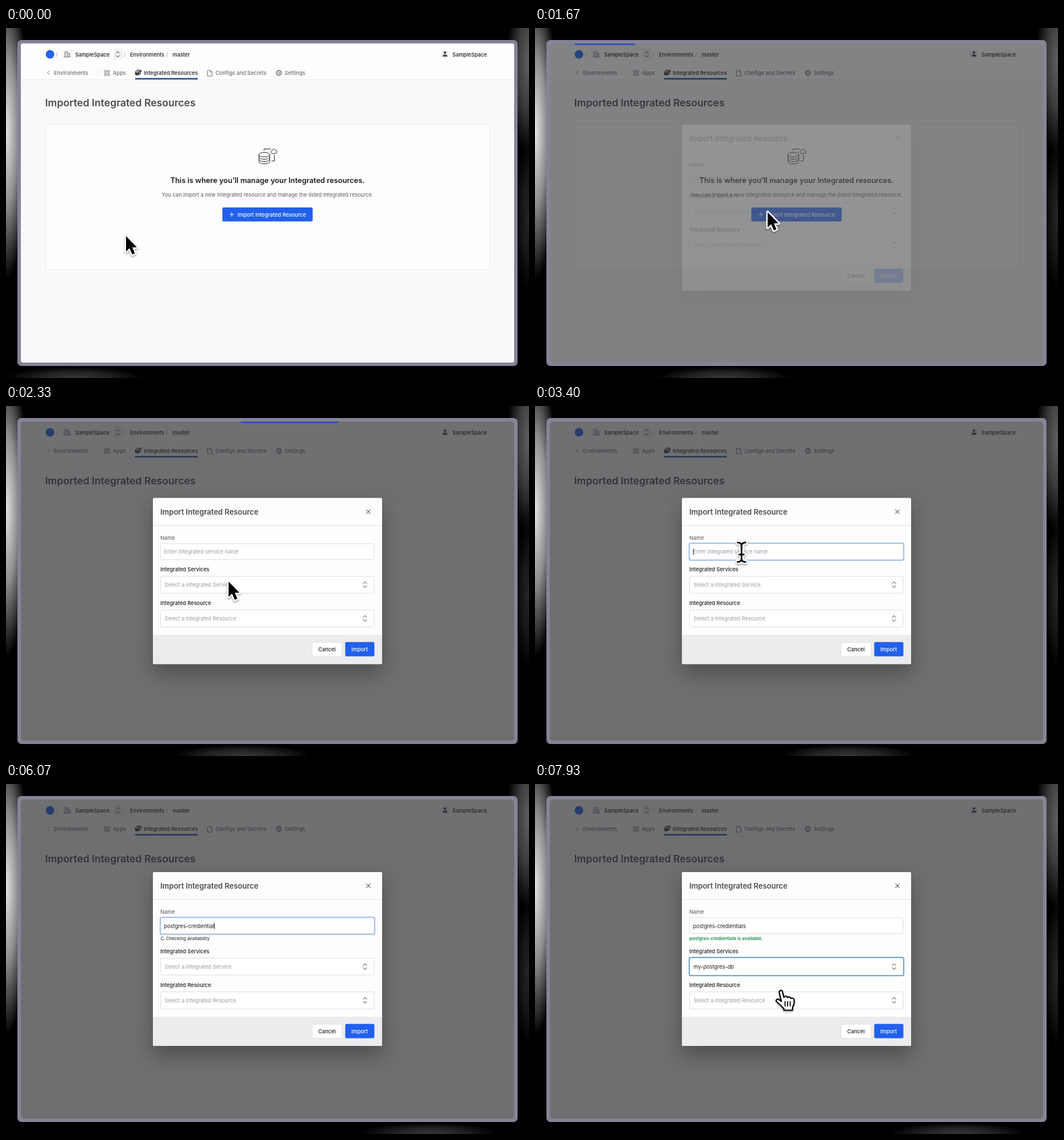
Write an HTML page that moves like this. It is 915 px wide and 612 px high and loops after 8000 ms.

```html
<!DOCTYPE html>
<html lang="en">
<head>
<meta charset="utf-8">
<title>Import Integrated Resource</title>
<style>
  html, body { margin: 0; width: 100%; height: 100%; overflow: hidden; background: #000; }
  svg { display: block; width: 100vw; height: 100vh; }
  text { font: 500 9.2px Inter, sans-serif; dominant-baseline: central; fill: #1d1d20; }
  .nav { fill: #6d6d75; }
  .active { fill: #37373c; font-weight: 600; }
  .regular { font-weight: 400; }
  .hint { font-weight: 400; fill: #9b9ba3; }
  .white { fill: #fff; }
  .mid { text-anchor: middle; }
  .icon { fill: none; stroke: #6d6d75; stroke-width: 1; stroke-linecap: round; stroke-linejoin: round; }
  .dark { stroke: #26262a; }
  .field { fill: #fff; stroke: #dcdce0; stroke-width: 1; }
  .ring { fill: none; stroke: #8fb5e6; stroke-width: 1.5; }
  #serviceRing { stroke: #4a90c4; }
  #modal { filter: drop-shadow(0 16px 18px rgba(0, 0, 0, .3)); }
  #pointer { filter: drop-shadow(0 2px 1.5px rgba(0, 0, 0, .35)); }
</style>
</head>
<body>
<svg viewBox="0 0 915 612" preserveAspectRatio="none">
  <defs>
    <radialGradient id="glow">
      <stop offset="0" stop-color="#fff"/>
      <stop offset=".5" stop-color="#fff" stop-opacity=".62"/>
      <stop offset="1" stop-color="#fff" stop-opacity="0"/>
    </radialGradient>
    <path id="sort" class="icon dark" d="M-3-2 0-5 3-2M-3 2 0 5 3 2"/>
    <path id="beamShape" d="M-7-17Q0-17 0-11V11Q0 17-7 17M7-17Q0-17 0-11M0 11Q0 17 7 17M-4 4H4"/>
    <clipPath id="screen"><rect x="26" y="27" width="863" height="558" rx="4"/></clipPath>
  </defs>

  <rect width="915" height="612"/>
  <g fill="url(#glow)">
    <ellipse cx="0" cy="180" rx="40" ry="260" opacity=".9"/>
    <ellipse cx="915" cy="60" rx="38" ry="160" opacity=".38"/>
    <ellipse cx="915" cy="330" rx="24" ry="130" opacity=".15"/>
    <ellipse id="bottomGlow" cy="612" rx="120" ry="20" opacity=".22"/>
  </g>
  <rect x="20" y="21" width="875" height="570" rx="7" fill="#858497"/>

  <g clip-path="url(#screen)">
    <rect x="26" y="27" width="863" height="558" fill="#f9f9f9"/>
    <rect x="26" y="27" width="863" height="63.5" fill="#fdfdfd"/>
    <path d="M26 90.5H889" stroke="#ebebed"/>
    <rect x="69.500" y="168.500" width="777" height="254" fill="#fdfdfd" stroke="#ececee"/>

    <circle cx="77" cy="46" r="7.500" fill="#2563eb"/>
    <g class="nav">
      <text x="87" y="46" class="hint">/</text>
      <text x="206" y="46" class="hint">/</text>
      <text x="280" y="46" class="hint">/</text>
    </g>
    <rect x="99" y="38" width="16" height="16" rx="2" fill="#f5f5f6"/>
    <path class="icon" d="M103 50.500V41.500H107.500V50.500M107.500 44.500H111.500V50.500M102 50.500H112.500M105 44V44.500M105 47V47.500M109.500 47V47.500"/>
    <text x="121" y="46">SampleSpace</text>
    <rect x="188" y="36" width="16" height="20" rx="2" fill="#f2f2f3"/>
    <use href="#sort" x="195.500" y="46"/>
    <text x="217" y="46">Environments</text>
    <text x="291.500" y="46">master</text>
    <circle cx="768" cy="46" r="7.500" fill="#efeff1"/>
    <circle cx="768" cy="43" r="2.200" fill="#45454b"/>
    <path d="M764 50V49Q764 46.500 766 46.500H770Q772 46.500 772 49V50Z" fill="#45454b"/>
    <text x="781" y="46">SampleSpace</text>

    <path class="icon" d="M75.500 75 72.500 78 75.500 81"/>
    <text x="84" y="78" class="nav">Environments</text>
    <path d="M160.500 72V85" stroke="#e4e4e7"/>
    <g class="icon">
      <circle cx="174" cy="76" r="2"/><circle cx="179.500" cy="76" r="2"/>
      <circle cx="174" cy="81.500" r="2"/><circle cx="179.500" cy="81.500" r="2"/>
      <path d="M353 74H357.500L360.500 77V84H353ZM357.500 74V77H360.500"/>
      <circle cx="477.500" cy="78.500" r="4.200" stroke-dasharray="2.200 1.100" stroke-width="1.600"/>
      <circle cx="477.500" cy="78.500" r="1.700"/>
    </g>
    <text x="187" y="78.500" class="nav">Apps</text>
    <g transform="translate(226 73) scale(.33)">
      <use href="#database" stroke-width="3.400"/>
    </g>
    <text x="241" y="78.500" class="active">Integrated Resources</text>
    <rect x="226" y="87.500" width="109.500" height="2.500" fill="#264a96"/>
    <text x="366.500" y="78.500" class="nav">Configs and Secrets</text>
    <text x="487.500" y="78.500" class="nav">Settings</text>

    <text x="68.500" y="130.500" style="font-size:17.600px;font-weight:600;fill:#4b4b51">Imported Integrated Resources</text>

    <g transform="translate(441 210)">
      <g id="database" fill="none" stroke="#26262a" stroke-linecap="round" stroke-linejoin="round">
        <ellipse cx="11" cy="11.500" rx="9.500" ry="4"/>
        <path d="M1.500 11.500V23.500C1.500 29 20.500 29 20.500 23.500V11.500M1.500 15.500C1.500 21 20.500 21 20.500 15.500M1.500 19.500C1.500 25 20.500 25 20.500 19.500M10.500 4V1.500H22M24 22.500H28.500V12"/>
        <path d="M24.500 9.500A2.500 2.500 0 0 1 24 4.800 3.500 3.500 0 0 1 30.300 3.500 3 3 0 0 1 29.500 9.500Z"/>
      </g>
    </g>
    <text x="457.500" y="266.500" class="mid" style="font-size:12.850px;font-weight:600">This is where you’ll manage your Integrated resources.</text>
    <text x="457.500" y="291.500" class="mid regular" style="fill:#5c5c63">You can import a new integrated resource and manage the listed integrated resource.</text>
    <rect x="378.500" y="313.700" width="158" height="24.600" rx="2" fill="#2160ec"/>
    <path class="icon" style="stroke:#fff" d="M391.500 326H398.500M395 322.500V329.500"/>
    <text x="465" y="326" class="mid white">Import Integrated Resource</text>

    <rect id="overlay" x="26" y="27" width="863" height="558" fill="#28282b"/>
    <rect id="loader" y="27" height="3" fill="#3553b4"/>
  </g>

  <g id="modal">
    <rect id="sheet" x="257" width="401" rx="2" fill="#fdfdfd"/>
    <text x="270" y="24" style="font-size:13px;font-weight:600;fill:#4b4b52">Import Integrated Resource</text>
    <path class="icon dark" d="M630.500 20.500 637.500 27.500M637.500 20.500 630.500 27.500"/>
    <path d="M257 48H658" stroke="#dededf"/>
    <text x="270" y="69.500" class="nav">Name</text>
    <rect class="field" x="270.500" y="80" width="373.500" height="27.500" rx="2"/>
    <rect id="nameRing" class="ring" x="269.700" y="79" width="375.500" height="30" rx="3"/>
    <text id="nameText" x="276.500" y="94"></text>
    <path id="caret" d="M0 88.500V99.500" stroke="#1d1d20"/>
    <g id="checking">
      <circle cx="274" cy="116" r="2.800" class="icon" stroke-dasharray="13 5" id="spinner"/>
      <text x="279.500" y="116" class="regular" style="font-size:7.900px">Checking availability</text>
    </g>
    <text id="available" x="270" y="116" style="font-size:7.800px;font-weight:700;fill:#2f9a5f">postgres-credientials is available.</text>

    <g id="lower">
      <text x="270" y="125">Integrated Services</text>
      <rect class="field" x="270.500" y="137" width="373.500" height="29.500" rx="2"/>
      <rect id="serviceRing" class="ring" x="269.700" y="135.700" width="375.500" height="32" rx="3"/>
      <text id="serviceText" x="277.500" y="151.700"></text>
      <use href="#sort" x="628" y="151.700"/>
      <text x="270" y="184">Integrated Resource</text>
      <rect class="field" x="270.500" y="196" width="373.500" height="29.500" rx="2"/>
      <text x="277.500" y="210.700" class="hint">Select a Integrated Resource</text>
      <use href="#sort" x="628" y="210.700"/>
      <path d="M257 239.500H658V288.500Q658 290.500 656 290.500H259Q257 290.500 257 288.500Z" fill="#ececee"/>
      <rect x="535.500" y="252.500" width="52.500" height="24.500" rx="2" fill="#fff" stroke="#e0e0e3"/>
      <text x="561.500" y="264.700" class="mid">Cancel</text>
      <rect x="593.500" y="252" width="51" height="25" rx="2" fill="#2160ec"/>
      <text x="618.700" y="264.700" class="mid white">Import</text>
    </g>
  </g>

  <g id="pointer" stroke-linejoin="round" stroke-linecap="round">
    <path id="arrow" d="M2 4V31L8 25 13 36 17.500 34 13 23.500H21Z" fill="#000" stroke="#fff" stroke-width="5" paint-order="stroke"/>
    <g id="beam" fill="none">
      <use href="#beamShape" stroke="#fff" stroke-width="7.500"/>
      <use href="#beamShape" stroke="#111" stroke-width="3"/>
    </g>
    <g id="hand" stroke="#000" stroke-width="2.200">
      <path d="M-2.500 3C-3.500-1.500 2-2.500 3 1.500L5.500 11C7 8 11 8.500 11.500 11.500 13 9.500 17 10 17.500 13 20 11.500 23.500 13 23.500 16.500 24 22 22 26 20.500 29V33.500H5.500V31C2 27-3 22-7.500 18.500-9.500 15.500-6 13-3 15L1 18Z" fill="#fff"/>
      <path d="M7.500 18.500V26M12 18.500V26M16.500 18.500V26" fill="none" stroke-width="1.800"/>
    </g>
  </g>
</svg>

<script>
const LOOP = 8000;
const NAME = 'postgres-credientials';
const TYPE_START = 4020, CHAR_TIME = 106;
const $ = id => document.getElementById(id);
const clamp = v => Math.min(1, Math.max(0, v));
const span = (t, from, to) => clamp((t - from) / (to - from));
const smooth = p => p * p * (3 - 2 * p);
const show = (id, on) => $(id).setAttribute('visibility', on ? 'visible' : 'hidden');
const set = (id, attrs) => Object.entries(attrs).forEach(([k, v]) => $(id).setAttribute(k, v));

// time, x, y of each pointer stop
const route = [
  [0, 208, 360], [200, 208, 360], [850, 217, 97], [1130, 218, 98], [1520, 405, 318],
  [2200, 405, 318], [2480, 366, 285], [2800, 358, 256], [6700, 410, 254],
  [6960, 422, 307], [7150, 426, 323], [7380, 426, 323], [7650, 430, 362], [LOOP, 430, 362]
];

function pointerAt(t) {
  const i = Math.max(1, route.findIndex(stop => stop[0] > t));
  const [t0, x0, y0] = route[i - 1], [t1, x1, y1] = route[i];
  const p = smooth(span(t, t0, t1));
  return [x0 + (x1 - x0) * p, y0 + (y1 - y0) * p];
}

function drawLoader(t) {
  const left = Math.max(69, 69 + (t - 1670) * .517);
  const right = Math.min(889, 174 + (t - 1670) * .617);
  set('loader', { x: left, width: Math.max(0, right - left) });
  show('loader', t >= 1560 && right > left);
}

function drawForm(t) {
  const typed = Math.max(0, Math.min(NAME.length, Math.floor((t - TYPE_START) / CHAR_TIME) + 1));
  const grown = typed > 0 ? 13.5 : 0;
  const rise = 9 * (1 - smooth(span(t, 1630, 1820)));
  $('modal').style.opacity = smooth(span(t, 1630, 1810));
  set('modal', { transform: `translate(0 ${160.8 - grown / 2 + rise})` });
  set('sheet', { height: 290.5 + grown });
  set('lower', { transform: `translate(0 ${grown})` });

  const nameFocus = t >= 3050 && t < 7250;
  show('nameRing', nameFocus);
  $('nameText').textContent = typed ? NAME.slice(0, typed) : 'Enter integrated service name';
  set('nameText', { class: typed ? 'regular' : 'hint' });
  const end = typed ? $('nameText').getComputedTextLength() : 0;
  set('caret', { transform: `translate(${277 + end} 0)` });
  const typing = typed > 0 && typed < NAME.length;
  show('caret', nameFocus && (typing || Math.floor(t / 500) % 2 === 0));

  show('checking', typed > 0 && t < 6550);
  show('available', t >= 6550);
  set('spinner', { transform: `rotate(${t * .36} 274 116)` });

  const chosen = t >= 7740;
  show('serviceRing', t >= 7250);
  $('serviceText').textContent = chosen ? 'my-postgres-db' : 'Select a Integrated Service';
  set('serviceText', { class: chosen ? 'regular' : 'hint' });
}

function drawPointer(t) {
  const [x, y] = pointerAt(t);
  set('pointer', { transform: `translate(${x} ${y})` });
  show('arrow', t < 2560);
  show('beam', t >= 2560 && t < TYPE_START || t >= 6700 && t < 6990);
  $('beam').style.opacity = 1 - .5 * span(t, 6850, 6990);
  show('hand', t >= 6990);
}

function draw(now) {
  const t = now % LOOP;
  $('overlay').style.opacity = .66 * span(t, 1550, 1690);
  set('bottomGlow', { cx: Math.min(740, 120 + t * .126) });
  drawLoader(t);
  drawForm(t);
  drawPointer(t);
}

const start = performance.now();
function tick() {
  draw(performance.now() - start);
  requestAnimationFrame(tick);
}
tick();
</script>
</body>
</html>
```
